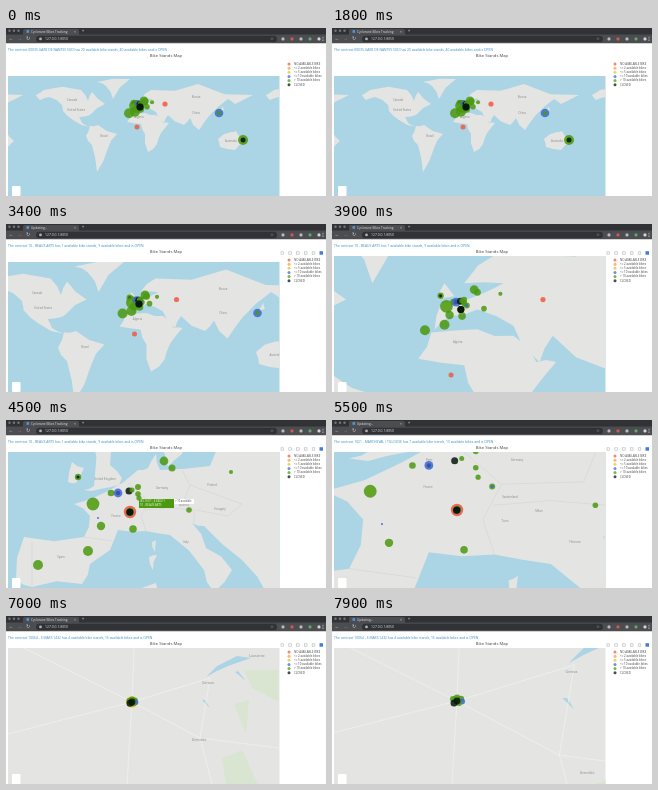
Recreate the animation shown at these times as an HTML page with a canvas. Size 320 by 168 pixels, loop 8000 ms.

```html
<!DOCTYPE html>
<html lang="en">
<head>
<meta charset="utf-8">
<title>Bike Stands Map</title>
<style>
html, body { margin: 0; width: 100%; height: 100%; overflow: hidden; background: #fff; }
canvas { display: block; width: 320px; height: 168px; }
</style>
</head>
<body>
<canvas id="stage"></canvas>
<script>
const canvas = document.getElementById('stage');
const ctx = canvas.getContext('2d');
const dpr = window.devicePixelRatio || 1;
canvas.width = 320 * dpr;
canvas.height = 168 * dpr;

const LOOP = 8000;
const WATER = '#abd4e4', LAND = '#e4e5e3';
const GREEN = '#4c990f', DARK = '#07170a', BLUE = '#3f68d4', RED = '#f15a40', YELLOW = '#e8c52e', ORANGE = '#f5a04a';

// time, zoom, focus x, focus y
const CAMERA = [
  [0, 1, 134, 79], [2000, 1, 134, 79], [3400, 1.5, 133, 80], [4500, 8.4, 124, 92],
  [5500, 19.7, 125, 90], [7000, 83, 126, 86], [7900, 125, 125, 85], [8000, 125, 125, 85]
];

// Each layer is drawn in pixels of its own zoom level, around its own focus.
const WORLD = { zoom: 1, x: 134, y: 79 };
const EUROPE = { zoom: 8.4, x: 124, y: 92 };
const FRANCE = { zoom: 19.7, x: 125, y: 90 };
const ALPS = { zoom: 83, x: 126, y: 86 };
const CITY = { zoom: 125, x: 125, y: 85 };

// Coasts have few corners; midpoint displacement makes them uneven.
function coast(pts) {
  const out = [];
  for (let i = 0; i < pts.length; i += 2) {
    const [x, y] = [pts[i], pts[i + 1]];
    const dx = pts[(i + 2) % pts.length] - x, dy = pts[(i + 3) % pts.length] - y;
    const bend = Math.sin(x * 12.9 + y * 78.2) * 0.1;
    out.push(x, y, x + dx / 2 - dy * bend, y + dy / 2 + dx * bend);
  }
  return out;
}

const america = [
  [30,67, 38,62, 75,62, 82,73, 86,64, 99,76, 85,86, 81,88, 73,89, 76,95, 85,99, 67,92, 57,83, 56,77, 43,69, 34,72],
  [91,54, 124,51, 107,71, 100,58],
  [84,98, 92,97, 111,106, 102,120, 91,144, 86,117, 80,108]
].map(coast);
const oldWorld = [
  [125,86, 139,85, 150,87, 157,95, 163,95, 155,105, 151,116, 142,124, 139,106, 135,96, 121,94],
  [126,85, 128,77, 141,74, 147,71, 135,71, 145,62, 192,56, 247,67, 229,76, 222,71, 203,88, 193,102,
   184,90, 178,97, 162,87, 158,95, 150,84, 139,79, 131,81],
  [127,76, 129,71, 132,75], [209,88, 217,78, 218,82],
  [212,111, 225,104, 230,103, 238,113, 229,122, 214,119]
].map(coast);

const europe = [
  [78,70, 88,66, 86,10, 100,10, 104,45, 116,58, 113,65, 94,69],
  [62,62, 66,42, 78,48, 70,63],
  [18,117, 78,117, 84,96, 68,84, 100,72, 132,50, 142,48, 150,34, 154,50, 204,46, 212,10, 700,-60, 700,300,
   262,176, 236,140, 198,106, 186,103, 200,128, 226,150, 208,172, 198,150, 164,115, 140,111, 112,110, 104,130,
   84,144, 76,164, 26,167, 10,160],
  [150,-20, 150,22, 162,47, 176,34, 190,-20],
  [146,122, 150,120, 149,132], [143,137, 151,135, 147,150],
  [20,182, 150,163, 166,400, -100,400]
].map(coast);

const borders = [
  [78,117, 107,121], [122,63, 143,81, 135,96, 140,111], [139,90, 164,88, 188,90, 188,103],
  [143,81, 178,80, 184,65, 176,50], [184,65, 236,84, 222,96, 190,90], [26,122, 26,166]
];
const roads = [
  [2,118, 83,97, 126,86, 204,62], [126,86, 128,32], [126,86, 121,168],
  [126,86, 194,122, 206,168], [18,32, 126,86], [204,62, 194,122, 273,132]
];
const lakes = [
  [200,61, 211,50, 231,40, 245,42, 222,50, 211,55],
  [196,84, 199,84, 204,92], [229,56, 232,55, 240,65]
];
const woods = [[238,54, 273,54, 273,86, 246,72], [228,88, 243,84, 240,119], [216,142, 236,134, 252,168, 220,168]];

// x, y, radius, colour, optional core colour
const europeMarkers = [
  [72,57,3.2,GREEN,DARK], [87,84,6.4,GREEN,'#63a91e'], [105,73,3.3,GREEN], [112,73,4.4,BLUE,'#314ea8'],
  [123,71,3.5,DARK], [126,70,2.5,GREEN], [132,67,3,GREEN], [132,74,2.8,GREEN], [133,78,2.6,GREEN],
  [139,82,3,GREEN,BLUE], [92,98,1.1,BLUE], [95,106,4.2,GREEN], [127,109,3.8,GREEN], [158,41,4.4,GREEN],
  [166,48,3.5,GREEN], [225,52,2.1,GREEN], [183,90,2.8,GREEN], [82,131,5,GREEN], [32,145,5,GREEN]
];
const worldMarkers = [[131,99,2.5,RED], [159,76,2.6,RED], [213,85,4.3,BLUE,GREEN], [237,112,5,GREEN,DARK]];
const cityMarkers = [
  [121,83,3,GREEN], [125,82,3.5,GREEN], [129,83,3.2,GREEN], [130,85.5,3,BLUE], [127,87,3,GREEN],
  [122,87,3.5,DARK], [125,85,3.4,DARK]
];

const labelSets = [
  { base: WORLD, from: 0, to: 4, items: [['Canada',66,72], ['United States',70,82], ['Brazil',98,108], ['Russia',190,69],
    ['China',190,85], ['Australia',225,113], ['Algeria',133,89]] },
  { base: EUROPE, from: 4, to: 13, items: [['United Kingdom',99,59], ['France',110,96], ['Germany',156,68], ['Poland',206,65],
    ['Spain',55,137], ['Italy',180,122], ['Austria',178,85], ['Hungary',214,89]] },
  { base: FRANCE, from: 13, to: 42, items: [['Paris',97,40], ['France',96,67], ['Switzerland',178,77], ['Turin',173,101],
    ['Milan',207,91], ['Florence',243,122], ['Germany',185,40]] },
  { base: ALPS, from: 42, to: 999, items: [['Geneva',202,67], ['Lausanne',251,40]] },
  { base: ALPS, from: 42, to: 103, items: [['Grenoble',193,124]] },
  { base: CITY, from: 103, to: 999, items: [['Grenoble',255,157]] }
];

const messages = [
  [0, '00035-GARE DE NANTES SUD has 20 available bike stands, 40 available bikes and is OPEN'],
  [3000, '10 - BEAUX ARTS has 1 available bike stands, 9 available bikes and is OPEN'],
  [5000, '1021 - MARCHEVAL / TILLOUSE has 7 available bike stands, 13 available bikes and is OPEN'],
  [6200, '10064 - 6 MARS 1432 has 4 available bike stands, 16 available bikes and is OPEN']
];
const updates = [[700, 1200], [3200, 3700], [5200, 5700], [7200, 8000]];

function rect(x, y, w, h, color, r = 0) {
  ctx.fillStyle = color;
  ctx.beginPath();
  ctx.roundRect(x, y, w, h, r);
  ctx.fill();
}
function dot(x, y, r, color, alpha = 1) {
  ctx.globalAlpha = alpha;
  ctx.fillStyle = color;
  ctx.beginPath();
  ctx.arc(x, y, r, 0, Math.PI * 2);
  ctx.fill();
  ctx.globalAlpha = 1;
}
function text(str, x, y, size, color, align = 'left') {
  ctx.font = `${size}px "Open Sans", sans-serif`;
  ctx.textAlign = align;
  ctx.textBaseline = 'middle';
  ctx.fillStyle = color;
  ctx.fillText(str, x, y);
}

function cameraAt(t) {
  const i = Math.max(1, CAMERA.findIndex(k => k[0] > t));
  const [a, b] = [CAMERA[i - 1], CAMERA[i]];
  const f = (t - a[0]) / (b[0] - a[0]);
  const mix = n => a[n] + (b[n] - a[n]) * f;
  return { zoom: a[1] * (b[1] / a[1]) ** f, x: mix(2), y: mix(3) };
}
function project(cam, base, x, y) {
  const s = cam.zoom / base.zoom;
  return [cam.x + (x - base.x) * s, cam.y + (y - base.y) * s];
}
function trace(cam, base, pts, shift = 0) {
  ctx.beginPath();
  for (let i = 0; i < pts.length; i += 2) ctx.lineTo(...project(cam, base, pts[i] + shift, pts[i + 1]));
}
function fillAll(cam, base, shapes, color, shift) {
  ctx.fillStyle = color;
  for (const s of shapes) { trace(cam, base, s, shift); ctx.fill(); }
}
function strokeAll(cam, base, lines, color, width) {
  ctx.strokeStyle = color;
  ctx.lineWidth = width;
  for (const l of lines) { trace(cam, base, l); ctx.stroke(); }
}
function drawMarkers(cam, base, list) {
  for (const [mx, my, r, color, core] of list) {
    const [x, y] = project(cam, base, mx, my);
    dot(x, y, r, color, 0.85);
    if (core) dot(x, y, r * 0.5, core, 0.85);
  }
}

function drawMap(t) {
  const cam = cameraAt(t);
  const top = Math.max(32, cam.y - 31 * cam.zoom ** 0.75);
  ctx.save();
  ctx.beginPath();
  ctx.rect(2, top, 271.5, 168 - top);
  ctx.clip();
  rect(0, 0, 320, 168, cam.zoom < 42 ? WATER : LAND);
  if (cam.zoom < 4) {
    for (const shift of [-230, 0, 230]) {
      fillAll(cam, WORLD, america, LAND, shift);
      fillAll(cam, WORLD, oldWorld, LAND, shift);
    }
  } else if (cam.zoom < 42) {
    fillAll(cam, EUROPE, europe, LAND);
    strokeAll(cam, EUROPE, borders, '#cfcdd2', 0.5);
  } else {
    fillAll(cam, ALPS, woods, '#d9e4d1');
    fillAll(cam, ALPS, lakes, WATER);
    strokeAll(cam, ALPS, roads, '#f3f3f2', 0.6);
  }
  for (const set of labelSets) {
    if (cam.zoom < set.from || cam.zoom >= set.to) continue;
    for (const [name, x, y] of set.items) {
      text(name, ...project(cam, set.base, x, y), set.from > 40 ? 3.4 : 2.9, '#858789', 'center');
    }
  }
  drawMarkers(cam, WORLD, worldMarkers);
  drawMarkers(cam, EUROPE, europeMarkers);
  if (cam.zoom > 4 && cam.zoom < 42) {
    dot(cam.x, cam.y, 6.2, RED, 0.9);
    dot(cam.x, cam.y, 4.3, '#829536');
  } else if (cam.zoom >= 42 && cam.zoom < 103) {
    dot(cam.x, cam.y, 5.8, YELLOW, 0.9);
  }
  drawMarkers(cam, CITY, cityMarkers);
  if (t >= 4200 && t < 4700) drawTooltip(cam.x + 9, cam.y - 13);
  rect(6, 158, 8.5, 10, '#fff', 1);
  ctx.restore();
}
function drawTooltip(x, y) {
  rect(x, y, 35, 9, GREEN);
  text('(45.7601°, 4.8402°)', x + 1, y + 2.5, 2.8, '#fff');
  text('10 - BEAUX ARTS', x + 1, y + 6.4, 2.8, '#fff');
  rect(x + 35, y, 20, 5, '#fff');
  text('> 10 available', x + 36, y + 2.5, 2.6, '#4d4d4d');
}

function drawBrowser(t) {
  rect(0, 0, 320, 7, '#303235');
  [3.5, 8, 12.5].forEach(x => dot(x, 2.8, 1.2, '#74777a'));
  rect(17, 1, 56, 7, '#4b4d50', 1.5);
  rect(0, 6.5, 320, 8.8, '#4b4d50');
  rect(20.5, 2.2, 2.6, 2.6, '#4a9be0');
  const updating = updates.some(([a, b]) => t >= a && t < b);
  text(updating ? 'Updating...' : 'Cyclorane Bikes Tracking', 25, 3.7, 3.2, '#dfe0e1');
  text('×', 69, 3.7, 4, '#c7c8ca', 'center');
  text('+', 77, 3.5, 4.5, '#c7c8ca', 'center');
  ['←', '→', '↻'].forEach((s, i) => text(s, 5 + i * 8.5, 10.8, 5, i === 1 ? '#85888b' : '#d4d5d7', 'center'));
  rect(30, 7.7, 241, 6.4, '#303235', 3.2);
  dot(34.5, 10.9, 1.4, '#aeb0b3');
  text('127.0.0.1:8050', 39, 10.9, 3.4, '#dedfe0');
  text('☆', 266, 10.8, 4.5, '#b9bbbd', 'center');
  ['#b9bbbd', '#d9584e', '#b9bbbd', '#60a967', '#d5d6d7'].forEach((c, i) => dot(277 + i * 9, 10.9, 1.6, c));
  [9.2, 10.9, 12.6].forEach(y => dot(317, y, 0.5, '#d4d5d7'));
}

function drawPage(t) {
  const message = messages.filter(m => m[0] <= t).pop()[1];
  text('The contract ' + message, 2, 22.6, 3.35, '#338cc5');
  text('Bike Stands Map', 160, 27.8, 4.2, '#444', 'center');
  const legend = [[RED, 'NO AVAILABLE BIKE'], [ORANGE, '<= 2 available bikes'], [YELLOW, '<= 5 available bikes'],
    [BLUE, '<= 10 available bikes'], [GREEN, '> 10 available bikes'], [DARK, 'CLOSED']];
  legend.forEach(([color, name], i) => {
    dot(283, 36 + i * 4.15, 1.5, color, 0.75);
    text(name, 288, 36 + i * 4.15, 2.9, '#444');
  });
  if (t < 2000) return;
  ctx.strokeStyle = '#b1b4b8';
  ctx.lineWidth = 0.6;
  for (let i = 0; i < 5; i++) ctx.strokeRect(275 + i * 7.8, 27.8, 2.6, 2.4);
  rect(313.5, 27.2, 3.5, 3.5, '#447adb');
}

// The screen refreshes four times in each half second, with a longer first hold.
function stepTime(t) {
  const rest = t % 500;
  return t - rest + (rest < 200 ? 0 : Math.floor(rest / 100) * 100);
}
function frame(now) {
  const t = stepTime(now % LOOP);
  ctx.setTransform(dpr, 0, 0, dpr, 0, 0);
  rect(0, 0, 320, 168, '#fff');
  drawMap(t);
  drawPage(t);
  drawBrowser(t);
  requestAnimationFrame(frame);
}
requestAnimationFrame(frame);
</script>
</body>
</html>
```
